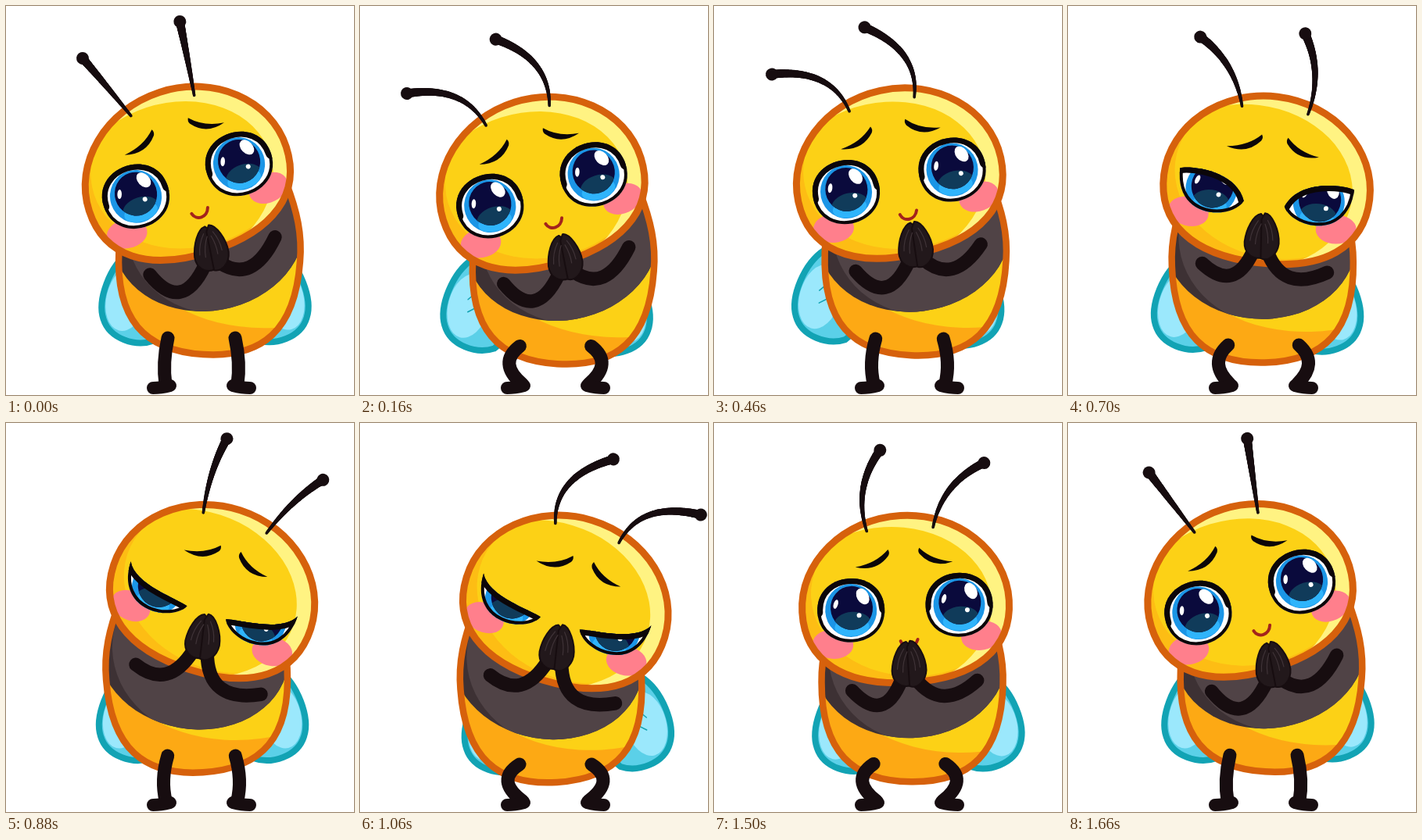
An HTML page with a canvas for the animation above (1.68 s loop, 445x498 px).

```html
<!DOCTYPE html>
<html lang="en">
<head>
<meta charset="utf-8">
<title>Pleading bee</title>
<style>
html, body { margin: 0; width: 100%; height: 100%; overflow: hidden; background: #fff; }
canvas { display: block; }
</style>
</head>
<body>
<canvas id="stage" width="445" height="498"></canvas>
<script>
const g = document.getElementById('stage').getContext('2d');
const LOOP = 1680, HALF = LOOP / 2, RAD = Math.PI / 180;
const INK = '#170d10', LASH = '#0b0609', RIM = '#d6610c', GOLD = '#fcd116', TEAL = '#12a3b4';

// Smooth monotone curve through [time, value] keys, repeating every loop.
function cycle(keys) {
  const n = keys.length;
  const key = i => {
    const k = Math.floor(i / n), [t, v] = keys[i - k * n];
    return [t + k * LOOP, v];
  };
  const slope = i => {
    const [a, b] = [key(i), key(i + 1)];
    return (b[1] - a[1]) / (b[0] - a[0]);
  };
  const tangent = i => {
    const a = slope(i - 1), b = slope(i);
    return a * b <= 0 ? 0 : 2 * a * b / (a + b);
  };
  return t => {
    let i = n - 1;
    while (i > 0 && keys[i][0] > t) i--;
    const [t0, v0] = key(i), [t1, v1] = key(i + 1);
    const h = t1 - t0, u = (t - t0) / h, w = 1 - u;
    return v0 * (1 + 2 * u) * w * w + v1 * u * u * (3 - 2 * u)
      + h * u * w * (tangent(i) * w - tangent(i + 1) * u);
  };
}
// The second half of the loop mirrors the first.
const swing = keys => cycle([...keys, ...keys.map(([t, v]) => [t + HALF, -v])]);

const tiltAt = swing([[0, -18], [200, -17.2], [470, -12], [700, 7], [820, 17.2]]);
const feelerAt = swing([[0, -7.5], [160, -36], [220, -39.5], [470, -37.5], [700, -23.5], [820, 5.5]]);
const wingAt = swing([[0, 3.5], [160, -12.5], [220, -15], [470, -16], [700, -9], [820, -4.5]]);
const OPEN = -54.5;
const lidAt = cycle([[0, OPEN], [540, OPEN], [700, -17], [860, 15], [1060, 15], [1260, OPEN]]);

function group(x, y, deg, draw) {
  g.save();
  g.translate(x, y);
  g.rotate(deg * RAD);
  draw();
  g.restore();
}

function oval(x, y, rx, ry, fill, deg = 0) {
  g.beginPath();
  g.ellipse(x, y, rx, ry, deg * RAD, 0, 2 * Math.PI);
  if (fill) { g.fillStyle = fill; g.fill(); }
}

function line(path, color, width) {
  g.strokeStyle = color;
  g.lineWidth = width;
  g.lineCap = g.lineJoin = 'round';
  g.stroke(path instanceof Path2D ? path : new Path2D(path));
}

function fill(path, color) {
  g.fillStyle = color;
  g.fill(path instanceof Path2D ? path : new Path2D(path));
}

// Shade everything in the current clip outside an oval.
function outside(x, y, rx, ry, color) {
  g.beginPath();
  g.rect(-200, -200, 400, 400);
  g.ellipse(x, y, rx, ry, 0, 0, 2 * Math.PI);
  g.fillStyle = color;
  g.fill('evenodd');
}

const wing = new Path2D('M-96 -76 C-122 -58 -138 -14 -130 10 C-122 36 -88 46 -66 38 C-40 20 -60 -60 -96 -76Z');
const trunk = new Path2D('M-92 -230 C-108 -195 -117 -165 -116 -130 C-115 -42 -76 -4 0 -4 C76 -4 115 -42 116 -130 C117 -165 108 -195 92 -230Z');
const skull = new Path2D('M-132.5 8 C-132.5 -56 -73 -108.5 0 -108.5 C73 -108.5 132.5 -56 132.5 8 C132.5 70 85 105.5 0 105.5 C-85 105.5 -132.5 70 -132.5 8Z');

function drawWings(sway, drop) {
  group(251 + sway, 390 + drop, -0.11 * sway, () => {
    for (const side of [1, -1]) {
      g.save();
      g.scale(side, 1);
      fill(wing, '#5bd0e8');
      g.save();
      g.clip(wing);
      oval(-100, -16, 26, 42, '#9be8fc', 14);
      line('M-101 -24 L-92 -32 M-101 -8 L-90 -14', TEAL, 1.5);
      g.restore();
      line(wing, TEAL, 8);
      g.restore();
    }
  });
}

function drawTrunk(tilt, drop) {
  group(252, 450 + drop, -0.2 * tilt, () => {
    g.save();
    g.clip(trunk);
    fill(trunk, '#fda914');
    oval(60, -132, 150, 90, GOLD);
    group(-3, -160, 0.78 * tilt, () => {
      oval(0, 0, 123, 100, '#3d3134');
      g.clip();
      oval(18, -5, 122, 112, '#504346');
    });
    g.restore();
    line(trunk, RIM, 8.5);
  });
}

function drawLegs(b) {
  for (const side of [1, -1]) {
    g.save();
    if (side < 0) { g.translate(500, 0); g.scale(-1, 1); }
    line(`M${207 - 3 * b} ${425 + 12 * b} Q${200 - 28 * b} 457 ${204 + 4 * b} 484`, INK, 17);
    line('M188 489 Q198 489 210 486', INK, 16);
    g.restore();
  }
}

function drawFeeler(x, angle, bend, length) {
  const at = (len, deg) => [x + len * Math.sin(deg * RAD), -91 - len * Math.cos(deg * RAD)];
  const [cx, cy] = at(0.55 * length, angle - bend), [ex, ey] = at(length, angle);
  for (let i = 0; i <= 100; i++) {
    const s = i / 100, w = 1 - s, r = 1.8 + 3.8 * s;
    oval(w * w * x + 2 * w * s * cx + s * s * ex, w * w * -91 + 2 * w * s * cy + s * s * ey, r, r, INK);
  }
  oval(ex, ey, 8, 8, INK);
}

// The eye is an upper and a lower curve between its corners; the upper one is the lid.
function drawEye(x, y, side, lid, shut) {
  const p = (px, py) => `${side * px} ${py}`;
  const outer = p(43, -12 * shut), inner = p(-43, 20 * shut);
  const top = `M${outer} C${p(43 - 14 * shut, lid)} ${p(14 * shut - 43, lid)} ${inner}`;
  const eye = new Path2D(`${top} C${p(12 * shut - 43, 54.5 - 8 * shut)} ${p(43, 54.5)} ${outer}Z`);
  group(x, y, 0, () => {
    g.clip(eye);
    fill(eye, '#fff');
    group(0, 9 * shut, 0, () => {
      oval(0, 0, 33, 34, '#1b95e6');
      oval(0, 21, 22, 12, '#2fb4fb');
      oval(1, -3, 27, 28, '#0a0a3c');
      g.save();
      g.clip();
      oval(1, 18, 24, 16, '#103b5a');
      g.restore();
      oval(16, -17, 7.5, 11, '#fff', -26);
      oval(-19, -9, 2.8, 6, '#fff', 20);
      oval(10, 7, 3, 3, '#fff');
    });
    line(eye, LASH, 8);
    line(top, LASH, 14);
  });
}

function drawBrow(outer, inner, dy) {
  const mid = outer + (inner - outer) * 0.62;
  group(0, dy, 0, () => fill(`M${outer} -42 Q${mid} -45 ${inner} -62 Q${inner + (inner - outer) * 0.06} -58 ${inner} -54 Q${mid} -34 ${outer} -42Z`, LASH));
}

function drawHead(tilt, drop, feeler, lid) {
  const shift = 0.2 * tilt;
  const shut = Math.min(1, (lid - OPEN) / 37.5);
  group(248 + 0.82 * tilt, 212.5 + drop, tilt, () => {
    g.translate(shift, 0);
    g.save();
    g.clip(skull);
    fill(skull, GOLD);
    outside(14, -10, 134, 108, '#fdbd14');
    outside(-22, 10, 132, 105, '#fff382');
    oval(-95.5, 51, 26, 18.5, '#ff7f8c', 8);
    oval(94.5, 51, 26, 18.5, '#ff7f8c', -8);
    g.restore();
    line(skull, RIM, 9);

    const over = Math.max(0, Math.abs(feeler) - 7);
    const bend = 1.35 * over * Math.sign(feeler);
    drawFeeler(-44, feeler - 14.5, bend, 96 + 0.45 * over);
    drawFeeler(41, feeler + 14.5, bend, 96 + 0.45 * over);

    drawEye(-70, 9, -1, lid, shut);
    drawEye(68.5, 10, 1, lid, shut);
    const frown = 8 * shut - 4;
    drawBrow(-60 + 2 * shift, -17 + 2 * shift, frown);
    drawBrow(63 - shift, 21 - shift, frown);
    line('M-9 52 C-6 63 9 63 13 51', '#a3231c', 4);
  });
}

function drawArms(tilt, drop) {
  const hx = 248 + 9 * Math.min(1, (tilt / 15) ** 2);
  const hy = 262 - 1.05 * tilt + drop, turn = 0.5 * tilt;
  const cos = Math.cos(turn * RAD), sin = Math.sin(turn * RAD);
  const wrist = x => `${hx + x * cos - 49 * sin} ${hy + x * sin + 49 * cos}`;
  line(`M${175 - 0.5 * tilt} ${326 - tilt + drop} Q${216 - 0.5 * tilt} ${368 - 1.5 * tilt + drop} ${wrist(-10)}`, INK, 17.5);
  line(`M${335 - 0.5 * tilt} ${321 + 1.4 * tilt + drop} Q${286 - 1.6 * tilt} ${357 + drop} ${wrist(8)}`, INK, 17.5);
  group(hx, hy, turn, () => {
    const left = 'M-3 1 C-13 3 -21 22 -22 38 C-22 51 -12 61 2 57 L1 5Z';
    const right = 'M2 0 C11 0 22 21 22 38 C21 52 10 62 0 58 L-2 8Z';
    for (const palm of [left, right]) {
      fill(palm, '#22181b');
      line(palm, INK, 2);
    }
    line('M-6 10 Q-14 22 -15 36 M-2 14 Q-8 26 -8 40 M6 9 Q13 20 14 34 M3 14 Q8 26 8 38', '#3f3337', 1.2);
  });
}

function draw(t) {
  const b = (1 - Math.cos(2 * Math.PI * t / 420)) / 2;
  const tilt = tiltAt(t);
  g.fillStyle = '#fff';
  g.fillRect(0, 0, 445, 498);
  drawWings(wingAt(t), 14 * b);
  drawTrunk(tilt, 14 * b);
  drawLegs(b);
  drawHead(tilt, 15 * b, feelerAt(t), lidAt(t));
  drawArms(tilt, 14 * b);
}

const start = performance.now();
function tick() {
  const t = (performance.now() - start) % LOOP;
  draw(Math.floor(t / 20) * 20);
  requestAnimationFrame(tick);
}
tick();
</script>
</body>
</html>
```
